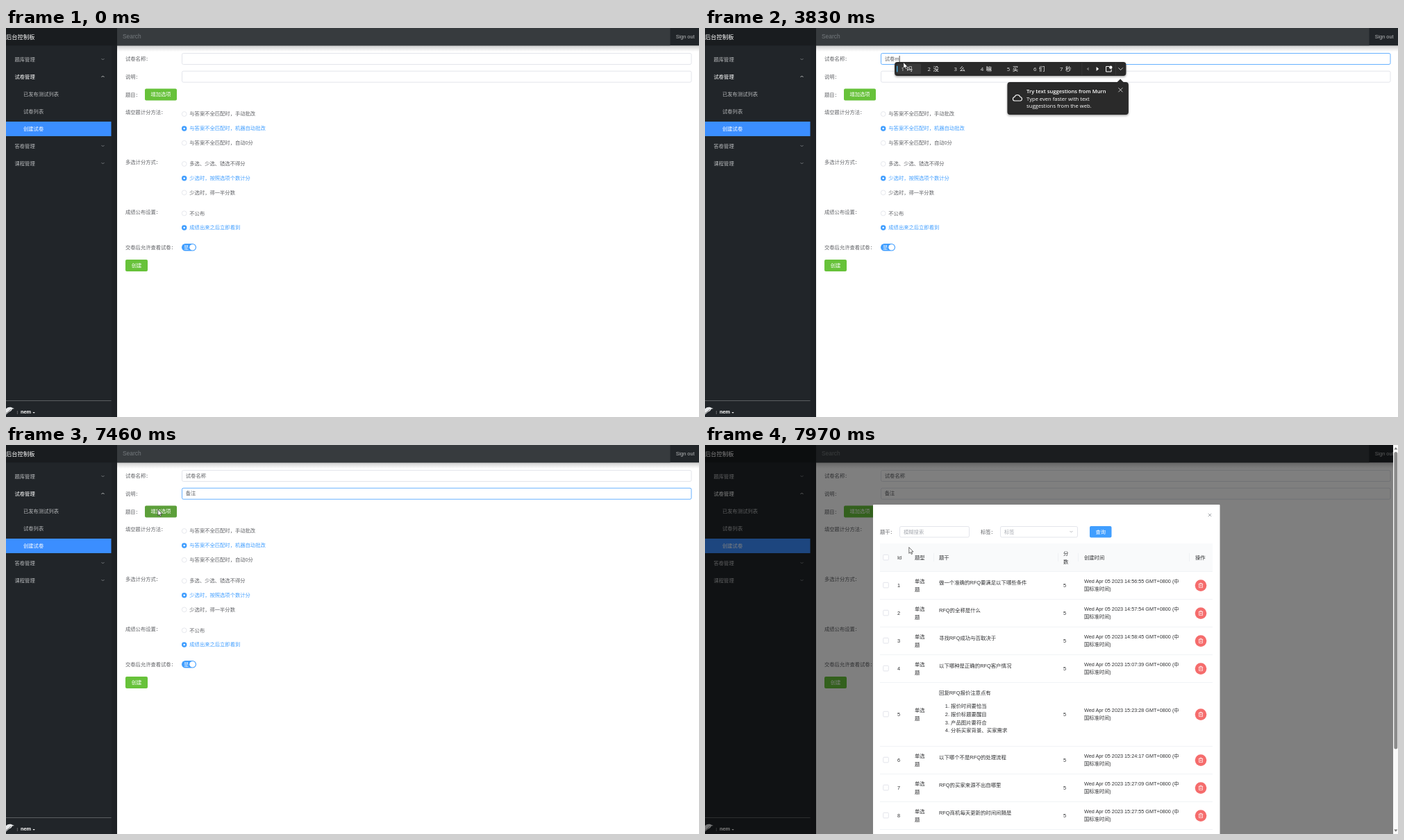
An HTML page for the animation above (8 s loop, 998 px wide and 561 px high).

```html
<!DOCTYPE html>
<html lang="zh-CN">
<head>
<meta charset="utf-8">
<title>创建试卷</title>
<style>
html, body { margin: 0; width: 100%; height: 100%; overflow: hidden; background: #fff; }
svg { display: block; width: 100%; height: 100%; }
text { font-family: 'Liberation Sans', 'Noto Sans CJK SC', 'Noto Sans CJK', sans-serif; white-space: pre; }
.ime text { font-family: 'Open Sans', 'Noto Sans CJK SC', 'Noto Sans CJK', sans-serif; }
</style>
</head>
<body>
<svg viewBox="0 0 998 561">
  <defs>
    <linearGradient id="drop" x2="0" y2="1">
      <stop stop-color="#000" stop-opacity=".2"/><stop offset="1" stop-color="#000" stop-opacity="0"/>
    </linearGradient>
    <filter id="shade" x="-10%" y="-30%" width="120%" height="180%">
      <feDropShadow dx="0" dy="1.5" stdDeviation="1.6" flood-opacity=".35"/>
    </filter>
  </defs>
  <g id="page"></g>
  <g id="live"></g>
</svg>
<script>
const LOOP = 8000;
const BLUE = '#409eff', GREEN = '#67c23a', GREY = '#606266', LINE = '#dcdfe6', INK = '#303133', HINT = '#a8abb2';

// Drawing helpers; text is placed by its vertical centre.
const text = (x, y, s, fill = GREY, size = 7.3, more = '') =>
  `<text x="${x}" y="${y + size * .37}" fill="${fill}" font-size="${size}" ${more}>${s}</text>`;
const middle = (x, y, s, fill, size, more = '') => text(x, y, s, fill, size, 'text-anchor="middle" ' + more);
const rect = (x, y, w, h, fill, r = 0, more = '') =>
  `<rect x="${x}" y="${y}" width="${w}" height="${h}" rx="${r}" fill="${fill}" ${more}/>`;
const frame = (x, y, w, h, stroke = LINE, r = 2, fill = '#fff') =>
  rect(x + .5, y + .5, w - 1, h - 1, fill, r, `stroke="${stroke}" stroke-width=".8"`);
const path = (d, stroke, width = .8, fill = 'none', more = '') =>
  `<path d="${d}" stroke="${stroke}" stroke-width="${width}" fill="${fill}" ${more}/>`;
const circle = (x, y, r, fill, more = '') => `<circle cx="${x}" cy="${y}" r="${r}" fill="${fill}" ${more}/>`;
const move = (x, y, s, more = '') => `<g transform="translate(${x} ${y})" ${more}>${s}</g>`;
const button = (x, y, w, h, label, fill) =>
  rect(x, y, w, h, fill, 2) + middle(x + w / 2, y + h / 2 - .4, label, '#fff', 7.3, 'font-weight="500"');
const chevron = (x, y, size, stroke, up = 1) => path(`M${x - size} ${y - size * up / 2}l${size} ${size * up}l${size} ${-size * up}`, stroke);
const cross = (x, y, r, stroke) => path(`M${x - r} ${y - r}l${2 * r} ${2 * r}m0 ${-2 * r}l${-2 * r} ${2 * r}`, stroke);

// Latest entry of a [time, ...values] table.
const at = (table, t) => table.reduce((found, row) => row[0] <= t ? row : found, table[0]);

function radio(y, label, on) {
  const dot = on ? circle(256.7, y, 3.7, BLUE) + circle(256.7, y, 1.3, '#fff')
                 : circle(256.7, y, 3.4, '#fff', `stroke="${LINE}" stroke-width=".7"`);
  return dot + text(264.3, y - .3, label, on ? BLUE : GREY);
}

function drawPage() {
  const menu = [
    [45, 12.5, '题库管理', 1], [70, 12.5, '试卷管理', -1], [95, 25, '已发布测试列表'], [120, 25, '试卷列表'],
    [145, 25, '创建试卷'], [170, 12.5, '答卷管理', 1], [195, 12.5, '课程管理', 1]];
  const labels = [[44, '试卷名称：'], [70, '说明：'], [96, '题目：'], [121.5, '填空题计分方法：'],
    [193.3, '多选计分方式：'], [265.3, '成绩公布设置：'], [316, '交卷后允许查看试卷：']];
  const radios = [[124, '与答案不全匹配时，手动批改'], [145, '与答案不全匹配时，机器自动批改', 1],
    [165.8, '与答案不全匹配时，自动0分'], [196, '多选、少选、错选不得分'], [216.7, '少选时，按照选项个数计分', 1],
    [237.4, '少选时，得一半分数'], [267.3, '不公布'], [288, '成绩出来之后立即看到', 1]];

  let s = rect(0, 0, 998, 561, '#fff') + rect(160, 25, 838, 9, 'url(#drop)');
  s += rect(0, 0, 160, 561, '#212529') + rect(152, 25, 8, 536, '#1e2125');
  s += rect(0, 0, 998, 25.3, '#212529') + rect(0, 0, 160, 25.3, '#191c1f') + rect(160, 0, 796.5, 25.3, '#373b3e');
  s += text(0, 12.7, '后台控制板', '#fff', 8.3, 'font-weight="500"');
  s += text(168, 12, 'Search', '#757a7e', 8.4) + text(964.7, 12, 'Sign out', '#b9bbbd', 7.3);
  s += rect(0, 135, 151.5, 21, '#3b8eff');
  for (const [y, x, label, fold] of menu) {
    const strong = fold === -1 || y === 145;
    s += text(x, y, label, strong ? '#fff' : '#b4b6b8', 7.3, strong ? 'font-weight="500"' : '');
    if (fold) s += chevron(139.5, y, 2, strong ? '#ddd' : '#85888b', fold);
  }
  s += rect(0, 537, 151.5, .8, '#6a6d70');
  s += path('M0 557.5V549Q3 546 7 546.8L12 549 9 549.4 7.5 552 4 554Z', 'none', 0, '#e6e8ea');
  s += path('M0 556L4 553 7 550', '#777', 1) + text(15.5, 554.5, '|', '#bbb', 5);
  s += text(21, 553.7, 'nem', '#fff', 7.4, 'font-weight="700"') + path('M38.4 554h3.4l-1.7 1.8z', 'none', 0, '#fff');
  for (const [y, label] of labels) s += text(172, y - .2, label);
  for (const row of radios) s += radio(...row);
  s += rect(253, 311, 21, 10.4, BLUE, 5.2) + circle(268.6, 316.2, 4.3, '#fff');
  s += text(256.2, 316, '是', '#fff', 6.8) + button(172, 334, 32, 17, '创建', GREEN);
  return s;
}

// Input method window: candidates per typed letters.
const CANDIDATES = {
  s: '是 上 说 时 三 所 四', sh: '是 上 说 时 少 手 谁', shi: '是 时 事 使 十 市 试',
  "shi'j": '世界 时间 是 时 事 使 十',
  m: '吗 没 么 嘛 买 们 秒', mi: '米 密 迷 秘 蜜 觅 咪', min: '民 敏 闽 闵 抿 皿 悯',
  "ming'c": '名称 明 名 命 鸣 铭 冥', "ming'ch": '名称 名城 明澈 名 明 命',
  b: '吧 不 把 被 并 比 别', be: '被 呗 本 北 备 背 倍', bei: '被 北 备 背 倍 杯 贝',
  "bei'z": '被子 杯子 备注 被 北 备', "bei'zh": '备注 被捉 北周 被 北 备'
};

function imeWindow(x, y, letters, opacity) {
  const words = CANDIDATES[letters].split(' ');
  let items = '', next = 9.3;
  words.forEach((word, i) => {
    items += text(next, 10, i + 1, '#e8e8e8', 7.8) + text(next + 8, 9.8, word, '#fff', 8.4);
    if (!i) items = rect(3, 2.5, 26 + word.length * 9, 15, '#393939', 2) + rect(3, 5.5, 1.2, 9, '#4cc2ff', .6) + items;
    next += 29.2 + word.length * 8.9;
  });
  const grow = Math.max(0, next - 276.5);
  const tools = rect(269.5, 1, .6, 18, '#3d3d3d') + path('M279.5 7.5v5l-3-2.5z', 'none', 0, '#777') +
    path('M290.5 7v6l3.5-3z', 'none', 0, '#fff') +
    path('M309 6.5h-4.5v7.5h7.5v-3.5', '#fff', 1) + circle(311.2, 7.8, 2.2, '#fff') +
    rect(318, 1, .6, 18, '#3d3d3d') + chevron(325.5, 10, 3.2, '#eee');
  const tip = rect(162.3, 29, 174.5, 47, '#2b2b2b', 4, 'filter="url(#shade)"') + path('M320 29.5l5-5 5 5z', 'none', 0, '#2b2b2b') +
    path('M172.5 56a2.8 2.8 0 0 1 .2-5.5 4.3 4.3 0 0 1 8.2 0 2.8 2.8 0 0 1 .3 5.5z', '#fff', 1.1) +
    text(190, 41.8, 'Try text suggestions from Murn', '#fff', 7.6, 'font-weight="600"') +
    text(190, 53.2, 'Type even faster with text', '#fff', 7.6) + text(190, 63.6, 'suggestions from the web.', '#fff', 7.6) +
    cross(325.3, 40.3, 3, '#eee');
  return move(x, y, rect(0, 0, 333.3 + grow, 20, '#2b2b2b', 4, 'filter="url(#shade)"') + items + move(grow, 0, tools + tip),
    `class="ime" opacity="${opacity}"`);
}

// time, committed text, letters being typed, caret shown, window opacity
const NAME = [
  [0, '', '', 0, 0], [910, '', '', 1, 0], [1310, '', '', 0, 0], [1910, '', '', 1, 0], [2010, '', 's', 1, .6],
  [2110, '', 's', 1, 1], [2210, '', 'sh', 1, 1], [2820, '', 'shi', 1, 1], [3030, '', "shi'j", 1, 1],
  [3430, '试卷', '', 1, 0], [3830, '试卷', 'm', 1, 1], [4040, '试卷', 'mi', 1, 1], [4130, '试卷', 'min', 1, 1],
  [4230, '试卷', "ming'c", 1, 1], [4430, '试卷', "ming'ch", 1, 1], [4730, '试卷名称', '', 1, 0], [5040, '试卷名称', '', 0, 0]];
const NOTE = [
  [0, '', '', 0, 0], [5040, '', '', 1, 0], [5540, '', 'b', 1, .6], [5650, '', 'b', 1, 1], [5740, '', 'be', 1, 1],
  [5850, '', 'bei', 1, 1], [6050, '', "bei'z", 1, 1], [6150, '', "bei'zh", 1, 1], [6550, '备注', '', 1, 0],
  [7250, '备注', '', 0, 0]];
const NAME_EDGE = [[0, LINE], [810, '#8ebff2'], [910, BLUE], [5040, '#8ebff2'], [5140, LINE]];
const NOTE_EDGE = [[0, LINE], [5040, '#8ebff2'], [5140, BLUE], [7560, '#b5c8e0'], [7660, LINE]];
const ADD_FILL = [[0, GREEN], [7250, '#85ce61'], [7360, '#6fb548'], [7460, '#5c9f3a'], [7560, '#62b237'], [7660, GREEN]];
const POINTER = [
  [0], [200, 744, 468, 'arrow'], [300, 585, 300, 'arrow'], [400, 400, 140, 'arrow'], [510, 277, 56, 'arrow'],
  [610, 286.5, 49.5, 'beam'], [2010, 285.8, 49.5, 'arrow'], [5540, 286.5, 49.5, 'beam'], [7050, 272, 58, 'arrow'],
  [7150, 240, 81, 'arrow'], [7250, 221, 95, 'arrow'], [7360, 218.8, 93, 'arrow'],
  [7760, 234, 95, 'arrow'], [7870, 272, 128, 'arrow'], [7970, 293.8, 147.5, 'arrow']];
// time, fade, inner fade, filled
const DIALOG = [[0, 0, 0, 0], [7560, .47, .35, 0], [7660, .85, .8, 0], [7760, 1, 1, 1]];

function field(y, edge, [, done, letters, caret]) {
  const typed = done + letters;
  const width = done.length * 7.3 + [...letters].reduce((w, c) => w + ("'ij".includes(c) ? 1.7 : c === 'm' ? 6.1 : 4.05), 0);
  return frame(253, y, 734.5, 17, edge) + text(258.8, y + 8, typed) +
    (caret ? rect(259 + width, y + 4, .8, 9, '#222') : '');
}

const ime = (y, [, done, letters, , opacity]) => opacity ? imeWindow(258.5 + done.length * 7.3, y, letters, opacity) : '';

function pointer([, x, y, kind]) {
  if (!kind) return '';
  return move(x, y, kind === 'beam'
    ? path('M-2-4.5H2M0-4.5V4.5M-2 4.5H2', '#222', .9)
    : path('M0 0V8.8L2 7 3.4 10 4.8 9.4 3.5 6.5H6.2Z', '#111', .6, '#fff'));
}

const checkbox = y => frame(256.2, y - 4.2, 8.6, 8.6, LINE, 1);

function searchBar() {
  return text(252, 125, '题干：') + frame(280, 117, 101, 16.5) + text(286, 125, '模糊搜索', HINT) +
    text(397, 125, '标签：') + frame(425, 117, 112, 16.5) + text(431, 125, '标签', HINT) +
    chevron(527.5, 125, 2, HINT) + button(554, 117, 31.5, 16.5, '查询', BLUE);
}

function emptyDialog() {
  const heads = [[279, 'Id'], [334, '题型'], [409, '题干'], [485, '分数'], [560, '创建时间'], [670, '操作']];
  const pages = ['‹', 1, 2, 3, 4, 5, '···', 8, '›'];
  let s = rect(244, 86, 504, 239, '#fff', 1) + move(2.5, 0, searchBar()) + cross(734, 101, 2.2, '#909399');
  s += rect(254, 142, 484, 29, '#f8f9fb') + move(3, 0, checkbox(157));
  for (const [x, label] of heads) s += text(x, 156.5, label, INK);
  s += path('M486 199l4-3h11l4 3v15h-19zM486 202h19', '#c8cbd0', .8, '#eceef1') + middle(495.5, 227, 'No Data', HINT, 7.3);
  pages.forEach((label, i) => {
    const x = 562.5 + i * 20.8;
    if (i !== 6) s += frame(x - 8, 267.5, 16.5, 16.5, i === 1 ? INK : LINE, 1);
    s += middle(x, 276, label, i ? GREY : HINT, 7.3);
  });
  return s + frame(254, 291, 32, 17) + middle(270, 299.3, '确定', GREY, 7.3);
}

const ROWS = [
  [202, '14:56:55', '做一个准确的RFQ要满足以下哪些条件'], [242, '14:57:54', 'RFQ的全称是什么'],
  [282, '14:58:45', '寻找RFQ成功与否取决于'], [322, '15:07:39', '以下哪种是正确的RFQ客户情况'],
  [388, '15:23:28', '回复RFQ报价注意点有', ['报价时间要恰当', '报价标题要醒目', '产品图片要符合', '分析买家背景、买家需求']],
  [454, '15:24:17', '以下哪个不是RFQ的处理流程'], [494, '15:27:09', 'RFQ的买家来源不出自哪里'],
  [534, '15:27:55', 'RFQ商机每天更新的时间间隔是']];

function tableRow([y, time, title, list], i) {
  let s = checkbox(y) + text(277, y, i + 1, INK) + text(302, y - 5.6, '单选', INK) + text(302, y + 5.8, '题', INK);
  s += text(337, list ? y - 31 : y - 4, title, INK, 7.4);
  (list || []).forEach((item, n) => s += text(345.8, y - 12 + n * 11.9, `${n + 1}. ${item}`, INK, 7.4));
  s += text(516, y, 5, INK) + text(546, y - 6, `Wed Apr 05 2023 ${time} GMT+0800 (中`, INK, 7.28) + text(546, y + 5.5, '国标准时间)', INK, 7.28);
  s += circle(714, y + .6, 8.3, '#f56c6c');
  s += path(`M710.8 ${y - 1.6}h6.4m-4.4 0v-1.2h2.4v1.2m-3.7 0v5.2h5v-5.2m-3.3 1.6v2m1.6-2v2`, '#fff', .7);
  return s + rect(252, y + (list ? 46 : 20.4), 479, .6, '#e8ebf1');
}

function filledDialog() {
  let s = rect(242, 86, 499.5, 480, '#fff', 1) + searchBar() + cross(727, 101, 2.2, '#909399');
  s += rect(252, 142, 479, 40, '#f9fafb') + rect(252, 182, 479, .6, '#e8ebf1') + checkbox(162);
  for (const x of [329, 508, 537, 697]) s += rect(x, 156, .6, 12, '#e8ebf1');
  for (const [x, y, label] of [[277, 162, 'Id'], [302, 162, '题型'], [337, 162, '题干'], [516, 156.3, '分'], [516, 167.8, '数'],
    [546, 162, '创建时间'], [706, 162, '操作']]) s += text(x, y, label, INK, 7.3, 'font-weight="500"');
  return s + ROWS.map(tableRow).join('');
}

function scrollbar() {
  return rect(991, 0, 7, 561, '#fafafa') + rect(992.3, 10, 5, 428.5, '#8b8b8b', 2.5) +
    path('M992.3 6.5h5l-2.5-3.2zM992.3 554.5h5l-2.5 3.2z', 'none', 0, '#777');
}

function dialog([, fade, inner, filled]) {
  if (!fade) return '';
  const body = move(0, (fade - 1) * 10.4, filled ? filledDialog() : emptyDialog(), `opacity="${inner}"`);
  return `<g opacity="${fade}">${rect(0, 0, 998, 561, 'rgba(0,0,0,.5)')}${body}</g>` + (filled ? scrollbar() : '');
}

function drawLive(t) {
  const name = at(NAME, t), note = at(NOTE, t);
  return field(36, at(NAME_EDGE, t)[1], name) + field(61.7, at(NOTE_EDGE, t)[1], note) +
    button(200, 87.5, 46, 17, '增加选项', at(ADD_FILL, t)[1]) +
    ime(49, name) + ime(75, note) + dialog(at(DIALOG, t)) + pointer(at(POINTER, t));
}

const live = document.getElementById('live');
document.getElementById('page').innerHTML = drawPage();
const marks = [NAME, NOTE, NAME_EDGE, NOTE_EDGE, ADD_FILL, POINTER, DIALOG].flat().map(row => row[0]);
const start = performance.now();
let shown = -1;

function tick() {
  const t = Math.max(0, performance.now() - start) % LOOP;
  const mark = Math.max(...marks.filter(m => m <= t));
  if (mark !== shown) live.innerHTML = drawLive(shown = mark);
  requestAnimationFrame(tick);
}
tick();
</script>
</body>
</html>
```
